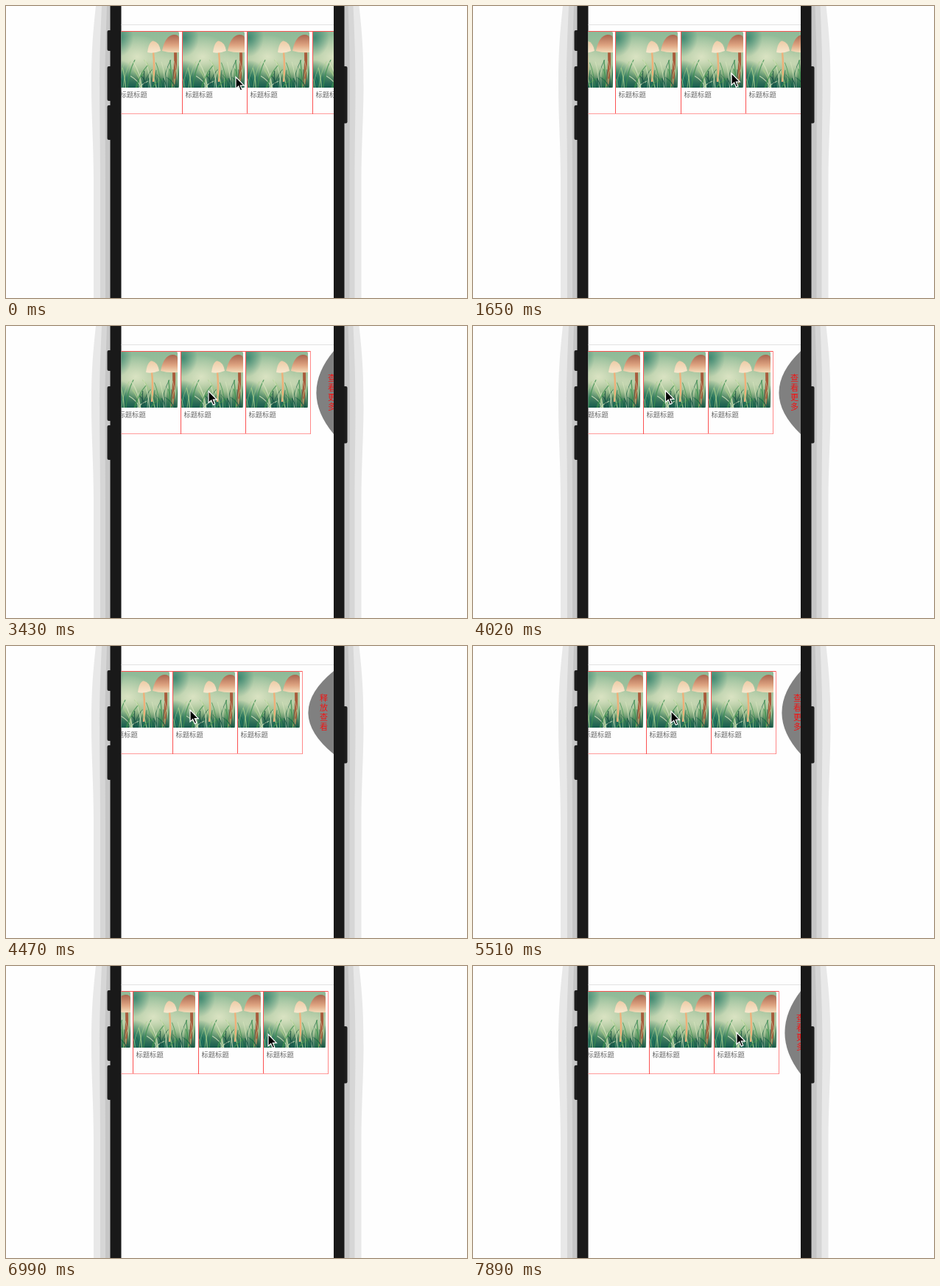
An HTML page for the animation above (8000 ms loop, 626 by 397 pixels).

```html
<!DOCTYPE html>
<html lang="zh-CN">
<head>
<meta charset="utf-8">
<title>Horizontal pull-to-view list</title>
<style>
  html, body { margin: 0; width: 100%; height: 100%; overflow: hidden; background: #fefefe; }
  svg { display: block; width: 626px; height: 397px; }
  text { font-family: "Noto Sans CJK SC", "Noto Sans CJK", sans-serif; }
  .title { font-size: 9.3px; fill: #666; }
  .hint { font-size: 11px; fill: #f01414; }
</style>
</head>
<body>
<svg viewBox="0 0 626 397">
  <defs>
    <linearGradient id="base" x2="0" y2="1">
      <stop offset="0" stop-color="#8dba98"/>
      <stop offset=".5" stop-color="#abc69f"/>
      <stop offset=".72" stop-color="#7fab78"/>
      <stop offset="1" stop-color="#174f42"/>
    </linearGradient>
    <radialGradient id="glow">
      <stop offset="0" stop-color="#dfe6c6" stop-opacity=".9"/>
      <stop offset="1" stop-color="#dfe6c6" stop-opacity="0"/>
    </radialGradient>
    <radialGradient id="teal">
      <stop offset="0" stop-color="#17705f" stop-opacity=".95"/>
      <stop offset="1" stop-color="#17705f" stop-opacity="0"/>
    </radialGradient>
    <linearGradient id="pale" x2="0" y2="1">
      <stop offset="0" stop-color="#eccba6"/>
      <stop offset="1" stop-color="#f8e8cf"/>
    </linearGradient>
    <linearGradient id="tan" x2="0" y2="1">
      <stop offset="0" stop-color="#a9664f"/>
      <stop offset=".6" stop-color="#dfa582"/>
      <stop offset="1" stop-color="#f5dcba"/>
    </linearGradient>
    <clipPath id="frame"><rect width="85" height="76" rx="1.5"/></clipPath>
    <clipPath id="screen"><rect x="156.500" width="288.500" height="397"/></clipPath>

    <g id="card">
      <g transform="translate(0 35)" clip-path="url(#frame)">
        <rect width="85" height="76" fill="url(#base)"/>
        <ellipse cx="28" cy="34" rx="38" ry="30" fill="url(#glow)"/>
        <ellipse cx="66" cy="44" rx="24" ry="22" fill="url(#glow)" opacity=".7"/>
        <ellipse cx="3" cy="8" rx="20" ry="26" fill="url(#teal)" opacity=".7"/>
        <ellipse cx="0" cy="66" rx="30" ry="28" fill="url(#teal)"/>
        <ellipse cx="50" cy="76" rx="38" ry="15" fill="url(#teal)" opacity=".8"/>
        <path d="M50 27Q52 48 50 68" fill="none" stroke="#eeb07a" stroke-width="2.4"/>
        <path d="M80 26Q81 50 77 74" fill="none" stroke="#a85c3c" stroke-width="4"/>
        <path d="M42 28Q44 13 50 12.500Q58 14 60 26Q50 30 42 28Z" fill="url(#pale)"/>
        <path d="M62 26Q66 5 78 4Q85 4 85 9V28Q72 29 62 26Z" fill="url(#tan)"/>
        <g id="grass" fill="none" stroke-linecap="round"/>
      </g>
      <path d="M0 34.500H89M.5 34V147" fill="none" stroke="#fb5252"/>
      <path d="M1 146.500H89" stroke="#ff9a9a"/>
      <text class="title" x="4.500" y="124">标题标题</text>
    </g>
  </defs>

  <rect width="626" height="397" fill="#fefefe"/>
  <g id="halo"></g>
  <g fill="#1d1d1d">
    <rect x="137.500" y="33" width="7" height="28" rx="2"/>
    <rect x="137.500" y="82" width="7" height="47" rx="2"/>
    <rect x="137.500" y="135" width="7" height="47" rx="2"/>
    <rect x="457" y="82" width="6.500" height="77.500" rx="2"/>
  </g>
  <rect x="141.500" width="318" height="397" fill="#191919"/>
  <rect x="156.500" width="288.500" height="397" fill="#fefefe"/>
  <path d="M156.500 25.500H445" stroke="#e2e2e2"/>

  <g clip-path="url(#screen)">
    <g id="cards"></g>
    <path id="edge" d="M0 34V147" stroke="#f88"/>
    <path id="bulge" fill="#808080"/>
    <g id="hint"></g>
  </g>
  <path id="cursor" d="M0 0V16L3.700 12.600L6.300 18.600L8.800 17.500L6.300 11.700H11.300Z"
        fill="#000" stroke="#fff" stroke-width="1.200"/>
</svg>
<script>
const LOOP = 8000, STEP = 148.8, PITCH = 88.5, RIGHT = 445, SWITCH_AT = 407;

// start ms, number of steps, cursor x, cursor y, right end of the list
const MOVES = [
  [0, 1, 311, 95, 504.4],
  [600, 4, 262, 93, 458.6],
  [1500, 2, 350, 90, 458.6],
  [1950, 3, 315, 88, 431],
  [2550, 3, 284, 86, 419.9],
  [2990, 4, 274, 87, 413.9],
  [3580, 1, 272, 87, 413],
  [3730, 6, 249, 85.5, 402.9],
  [5070, 1, 248, 86, 402.9],
  [5360, 5, 298, 89, 425.4],
  [6410, 3, 330, 91, 437.5],
  [6860, 3, 405, 92, 437.5],
  [7440, 4, 357, 89, 415.9]
];

const $ = id => document.getElementById(id);

function add(parent, tag, attrs) {
  const el = document.createElementNS("http://www.w3.org/2000/svg", tag);
  for (const key in attrs) el.setAttribute(key, attrs[key]);
  return parent.appendChild(el);
}

// Soft shadow bands, mirrored around the phone
function band(top, mid, bottom, fill) {
  const side = (x, s) => `${x - s * top} 0C${x - s * (mid - 1)} 45 ${x - s * mid} 70 ${x - s * mid} 110` +
    `S${x - s * bottom} 190 ${x - s * bottom} 240V397`;
  add($("halo"), "path", { d: `M${side(142, 1)}H300V0Z`, fill });
  add($("halo"), "path", { d: `M${side(459.5, -1)}H300V0Z`, fill });
}
band(20, 26, 23, "#e8e8e8");
band(12, 15, 14, "#d6d6d6");
band(5, 7.5, 7, "#c6c6c6");

let seed = 11;
const rand = () => (seed = (seed * 16807) % 2147483647) / 2147483647;
const GREENS = ["#1c6548", "#3f9150", "#164f42", "#a9cf8c", "#d5e4bd"];
for (let i = 0; i < 45; i++) {
  const x = rand() * 88, lean = (rand() - .5) * 34, h = 10 + rand() * 30;
  add($("grass"), "path", {
    d: `M${x} 77Q${x + lean * .2} ${77 - h * .6} ${x + lean} ${77 - h}`,
    stroke: GREENS[i % GREENS.length], "stroke-width": .6 + rand() * .9, opacity: .8
  });
}

const cards = Array.from({ length: 5 }, () => add($("cards"), "use", { href: "#card" }));
const glyphs = [75, 88, 101, 114].map(y => add($("hint"), "text", { class: "hint", y }));

function stateAt(t) {
  let i = MOVES.length - 1;
  while (MOVES[i][0] > t) i--;
  const [start, steps, ...to] = MOVES[i];
  const from = MOVES[Math.max(0, i - 1)].slice(2);
  const p = Math.min(1, (Math.floor((t - start + 8) / STEP) + 1) / steps);
  return to.map((v, k) => from[k] + (v - from[k]) * p);
}

function draw(now) {
  const [x, y, end] = stateAt(now % LOOP);
  const shift = (el, dx, dy = 0) => el.setAttribute("transform", `translate(${dx} ${dy})`);
  cards.forEach((card, k) => shift(card, Math.round(end - PITCH * (k + 1))));
  shift($("edge"), Math.floor(end) + .5);

  const sag = Math.max(0, RIGHT - end - 7.5);
  $("bulge").setAttribute("d", `M${RIGHT} 34Q${RIGHT - 2 * sag} 90.5 ${RIGHT} 147Z`);

  const label = end < SWITCH_AT ? "释放查看" : "查看更多";
  glyphs.forEach((g, k) => { if (g.textContent !== label[k]) g.textContent = label[k]; });
  shift($("hint"), end + 23);
  shift($("cursor"), x + 1, y + 1.5);
}

function tick() {
  draw(performance.now());
  requestAnimationFrame(tick);
}
tick();
</script>
</body>
</html>
```
